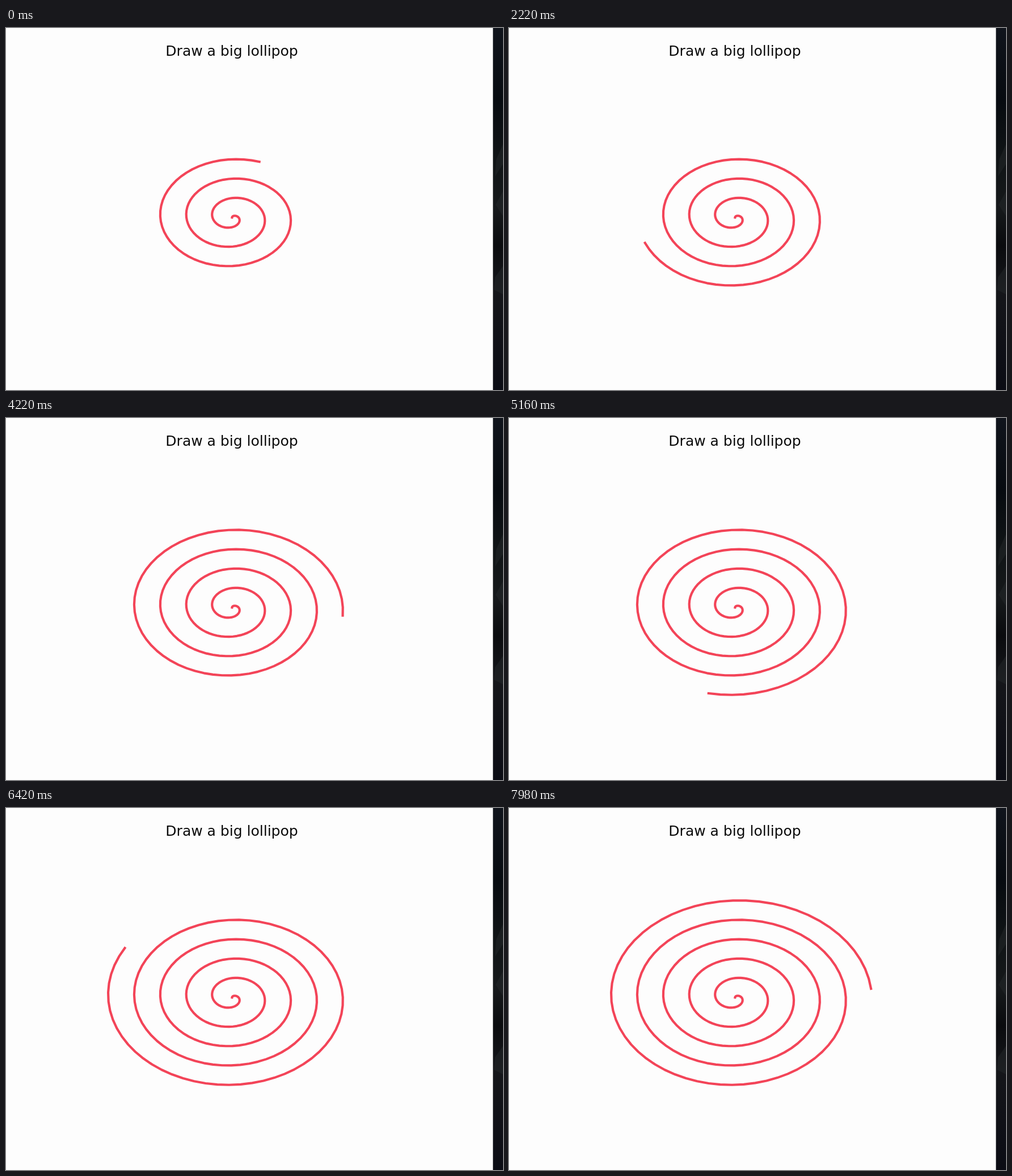
Write an HTML page that moves like this. It is 876 px wide and 639 px high and loops after 8000 ms.

```html
<!DOCTYPE html>
<html lang="en">
<head>
<meta charset="utf-8">
<title>Draw a big lollipop</title>
<style>
  html, body { margin: 0; width: 100%; height: 100%; overflow: hidden; background: #fdfdfd; }
  svg { display: block; width: 876px; height: 639px; }
  text { font: 25px "DejaVu Sans", sans-serif; text-anchor: middle; fill: #0a0a0a; }
  #spiral { fill: none; stroke: #f34458; stroke-width: 4.17; stroke-linecap: square; stroke-linejoin: round; }
</style>
</head>
<body>
<svg viewBox="0 0 876 639">
  <defs>
    <linearGradient id="dusk" x1="0" y1="0" x2="0" y2="1">
      <stop offset="0" stop-color="#10141c"/>
      <stop offset=".2" stop-color="#070b10"/>
      <stop offset=".36" stop-color="#101416"/>
      <stop offset=".5" stop-color="#16191b"/>
      <stop offset=".6" stop-color="#0a0b0e"/>
      <stop offset=".72" stop-color="#15161a"/>
      <stop offset="1" stop-color="#0b0c14"/>
    </linearGradient>
  </defs>
  <rect width="876" height="639" fill="#fdfdfd"/>
  <rect x="858.3" width="18" height="639" fill="url(#dusk)"/>
  <path d="M876 205L864 232L862 262L876 240ZM876 288L863 312L876 332ZM876 420L862 440L860 462L876 470Z" fill="#24282a" opacity=".5"/>
  <text x="398" y="49">Draw a big lollipop</text>
  <path id="spiral"/>
</svg>
<script>
const LOOP = 8000;
const STEP = 0.1; // radians between plotted points
const CENTER = { x: 398.4, y: 334.5 };
const SCALE = { x: 45.95 / (2 * Math.PI), y: 34.26 / (2 * Math.PI) };

// [time in ms, points plotted]; drawing slows down as the curve grows
const PACE = [[0, 192], [960, 209], [2220, 232], [3340, 252], [5160, 285], [6420, 304], [7980, 329], [8000, 329]];

const spiral = document.getElementById("spiral");

function pointCount(ms) {
  const i = Math.max(1, PACE.findIndex(([time]) => time >= ms));
  const [t0, n0] = PACE[i - 1];
  const [t1, n1] = PACE[i];
  return Math.floor(n0 + 0.5 + (n1 - n0) * (ms - t0) / (t1 - t0));
}

function point(i) {
  const a = i * STEP;
  const x = CENTER.x + SCALE.x * a * Math.sin(a);
  const y = CENTER.y - SCALE.y * a * Math.cos(a);
  return x.toFixed(2) + " " + y.toFixed(2);
}

function render(ms) {
  const points = Array.from({ length: pointCount(ms) + 1 }, (_, i) => point(i));
  spiral.setAttribute("d", "M" + points.join("L"));
}

const start = performance.now();
function tick() {
  render((performance.now() - start) % LOOP);
  requestAnimationFrame(tick);
}
tick();
</script>
</body>
</html>
```
